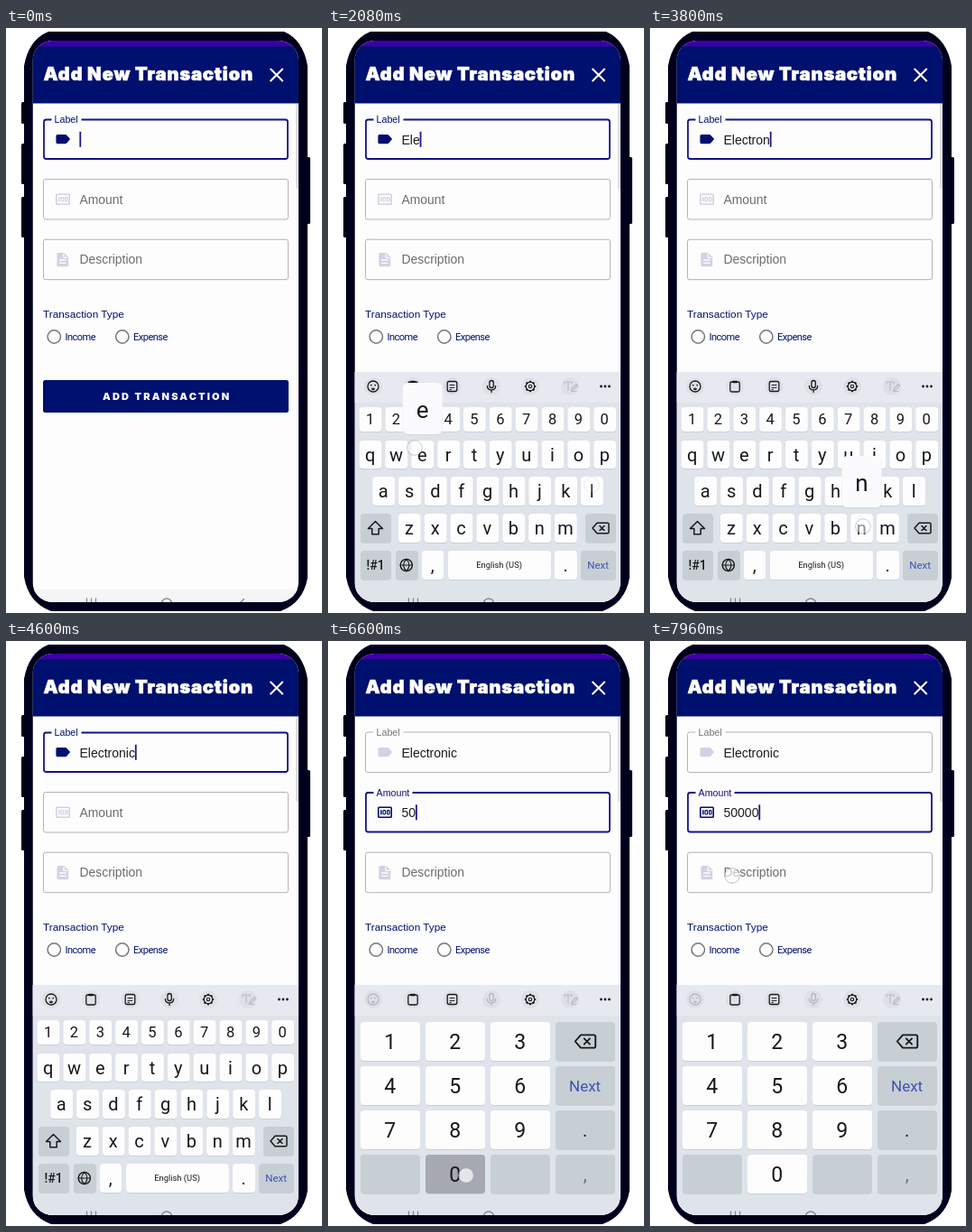
Recreate the animation shown at these times as an HTML page. Size 350 px wide and 648 px high, loop 8 s.

```html
<!DOCTYPE html>
<html lang="en">
<head>
<meta charset="utf-8">
<title>Add New Transaction</title>
<style>
html, body { margin: 0; width: 100%; height: 100%; overflow: hidden; background: #fff; }
svg { display: block; width: 350px; height: 648px; }
text { white-space: pre; }
.sans { font-family: "Liberation Sans", Arial, sans-serif; }
.rob { font-family: Roboto, sans-serif; }
.black { font-family: Inter, sans-serif; font-weight: 900; }
.mid { text-anchor: middle; }
.line { fill: none; stroke-linecap: round; stroke-linejoin: round; }
</style>
</head>
<body>
<svg id="stage" viewBox="0 0 350 648"></svg>
<script>
const LOOP = 8000;
const NAVY = '#00106e', INK = '#17181c', KEY = '#fdfdfe', GREY = '#c7cfd5', DOWN = '#a6a9b2';
const ACTIVE = '#14128c', IDLE = '#b3b3b8', PALE = '#d2d2e4';
const stage = document.getElementById('stage');
const $ = id => document.getElementById(id);
const clamp = v => Math.max(0, Math.min(1, v));
const ease = v => 1 - (1 - clamp(v)) ** 3;
const set = (id, attrs) => { for (const k in attrs) $(id).setAttribute(k, attrs[k]); };
const show = (id, on) => $(id).setAttribute('visibility', on ? 'visible' : 'hidden');

const rect = (x, y, w, h, fill, rx = 0, more = '') =>
  `<rect x="${x}" y="${y}" width="${w}" height="${h}" rx="${rx}" fill="${fill}" ${more}/>`;
const text = (x, y, size, fill, str, cls = 'sans', more = '') =>
  `<text x="${x}" y="${y}" font-size="${size}" fill="${fill}" class="${cls}" ${more}>${str}</text>`;
const line = (d, color, w = 1.4, more = '') =>
  `<path class="line" d="${d}" stroke="${color}" stroke-width="${w}" ${more}/>`;
const ring = (x, y, r, color, w = 1.4) =>
  `<circle cx="${x}" cy="${y}" r="${r}" fill="none" stroke="${color}" stroke-width="${w}"/>`;

// Keys
const keys = {};
function key(id, x, y, w, h, label, size, fill = KEY, color = INK, more = '') {
  keys[id] = { x, y, w, h, fill };
  return rect(x, y + 1, w, h, '#cbd0d8', 4) + rect(x, y, w, h, fill, 4, `id="k-${id}"`) +
    text(x + w / 2 - 0.4, y + h / 2 + size * 0.36, size, color, label, 'rob mid', `id="t-${id}" ${more}`);
}
const row = (chars, cx, y, h, size) => [...chars].map((c, i) =>
  key(c, cx + i * 28.85 - 12.4, y, 24.8, h, c, size)).join('');

function letterPad() {
  const globe = ring(86.8, 595, 6.6, INK) +
    line('M80.2 595h13.2M86.8 588.4c-4.2 4-4.2 9.2 0 13.2M86.8 588.4c4.2 4 4.2 9.2 0 13.2', INK, 1.2);
  return row('1234567890', 47, 420, 27, 16.5) + row('qwertyuiop', 47, 457, 31, 20) +
    row('asdfghjkl', 61.7, 497, 32, 20) + row('zxcvbnm', 90.3, 538, 32, 20) +
    key('shift', 36, 538, 34, 32, '', 16, GREY) + key('del', 285, 538, 34, 32, '', 16, GREY) +
    key('sym', 36, 579, 34, 32, '!#1', 14, GREY, INK, 'font-weight="500"') +
    key('globe', 75, 579, 25, 32, '', 16, GREY) +
    key('comma', 104, 579, 24, 32, ',', 20) + key('space', 133, 579, 114, 32, 'English (US)', 9.4) +
    key('dot', 251, 579, 25, 32, '.', 20) + key('next', 280, 579, 39, 32, 'Next', 11.5, GREY, '#4050b4') +
    line('M52.5 546.5l8 8h-4.3v6.2h-7.4v-6.2h-4.3z', INK, 1.5, 'id="arrow"') +
    backspace(302, 554, 1) + globe;
}
function backspace(x, y, s) {
  return `<g transform="translate(${x} ${y}) scale(${s})">` +
    line('M-9 0l5-5.7h11.5q1.5 0 1.5 1.5v8.4q0 1.5-1.5 1.5h-11.5zM-1 -2.5l5 5M4 -2.5l-5 5', INK, 1.5) + '</g>';
}
function numberPad() {
  const cols = [36, 108, 180, 252], rows = [422, 471, 520, 569];
  let out = '';
  for (let i = 0; i < 9; i++)
    out += key('n' + (i + 1), cols[i % 3], rows[i / 3 | 0], 66, 43, i + 1, 23);
  out += key('b1', 36, 569, 66, 43, '', 20, GREY) + key('n0', 108, 569, 66, 43, '0', 23) +
    key('b2', 180, 569, 66, 43, '', 20, GREY);
  ['', 'Next', '.', ','].forEach((c, i) => {
    out += key('side' + i, 252, rows[i], 66, 43, c, i === 1 ? 17 : 20, GREY, [INK, '#4050b4', INK, '#6a6f78'][i]);
  });
  return out + backspace(285, 443.5, 1.25);
}
function toolbar() {
  const disc = [50, 94, 137.5, 181, 224, 268].map(x =>
    `<circle cx="${x}" cy="397" r="10" fill="#dde0e6"/>`).join('');
  const teeth = [...Array(8)].map((_, i) =>
    `<path d="M223.2 390.8h1.6l.5 2h-2.6z" fill="${INK}" transform="rotate(${i * 45} 224 397)"/>`).join('');
  return disc +
    `<g id="face">${ring(50, 397, 6, INK, 1.3)}<circle cx="47.8" cy="395.6" r=".9" fill="${INK}"/><circle cx="52.2" cy="395.6" r=".9" fill="${INK}"/>` +
    line('M47.2 398.8q2.8 3 5.6 0', INK, 1.2, 'id="mouth"') + '</g>' +
    rect(88.8, 392, 10.4, 11, 'none', 1.8, `stroke="${INK}" stroke-width="1.3"`) + rect(91, 390.7, 6, 2.6, INK, 1) +
    rect(132.2, 391.5, 10.6, 11, 'none', 2, `stroke="${INK}" stroke-width="1.3"`) +
    line('M135 395.5h5M135 398.3h5M135 400.4h1.5', INK, 1) +
    `<g id="mic">${rect(178.9, 390.5, 4.4, 8, 'none', 2.2, `stroke="${INK}" stroke-width="1.3"`)}` +
    line('M176.4 396.5q0 4.4 4.6 4.4t4.6-4.4M181 401v2.5', INK, 1.3) + '</g>' +
    teeth + ring(224, 397, 4.8, INK, 1.2) + ring(224, 397, 1.7, INK, 1.1) +
    line('M262 394v-2h8v2M266 392v9M269.5 402l1-3 4.5-4.5 1.6 1.6-4.6 4.6zM270 402.5h5', '#b8bcc3', 1.2) +
    [302.5, 307, 311.5].map(x => `<circle cx="${x}" cy="397" r="1.4" fill="${INK}"/>`).join('');
}

// Form
const field = (id, y) => rect(41.5, y, 271, 44.5, 'none', 2.5, `id="${id}" stroke="${IDLE}"`);
// The thicker active outline keeps the same outer edge.
function outline(id, y, on) {
  const inset = on ? 0.5 : 0;
  set(id, {
    x: 41.5 + inset, y: y + inset, width: 271 - 2 * inset, height: 44.5 - 2 * inset,
    stroke: on ? ACTIVE : IDLE, 'stroke-width': on ? 1.8 : 1
  });
}
function form() {
  const radio = (x, label, tx) => ring(x, 342, 7.2, '#77777b', 1.5) +
    text(tx, 346.2, 11, NAVY, label, 'rob', 'letter-spacing="-.5"');
  return rect(29.5, 14, 294.5, 622, '#fdfdfd') + rect(29.5, 14, 294.5, 8, '#3a00a6') +
    rect(29.5, 20.5, 294.5, 63, NAVY) +
    text(41.5, 57.8, 20.4, '#fff', 'Add New Transaction', 'black', 'letter-spacing=".72" stroke="#fff" stroke-width=".6"') +
    line('M293.2 45.5l13 13M306.2 45.5l-13 13', '#fff', 2) +
    rect(321, 84, 3, 94, '#dedee2', 1) +
    field('box1', 101) + rect(50.5, 99, 33, 5, '#fdfdfd') +
    text(53.5, 105.3, 10.7, NAVY, 'Label', 'sans', 'id="cap1"') +
    '<path id="tag" d="M57 118h8.8q.9 0 1.5.7l3.8 4.4-3.8 4.4q-.6.7-1.5.7h-8.8q-1.6 0-1.6-1.6v-7q0-1.6 1.6-1.6z"/>' +
    text(81.5, 128.5, 14, '#1c1c20', '', 'sans', 'id="val1"') +
    field('box2', 167.5) + rect(50.5, 165.5, 43, 5, '#fdfdfd', 0, 'id="notch"') +
    text(0, 0, 13.9, '#6c6c70', 'Amount', 'sans', 'id="cap2"') +
    `<g id="note">${rect(55.8, 184.3, 14.4, 11, 'none', .8, 'stroke-width="1.6"')}` +
    '<path d="M58.8 187.3v5" stroke-width="1.5"/>' + rect(61, 187.6, 2.6, 4.4, 'none', .8, 'stroke-width="1.2"') +
    rect(65.6, 187.6, 2.4, 4.4, 'none', .8, 'stroke-width="1.2"') + '</g>' +
    text(81.5, 195, 14, '#1c1c20', '', 'sans', 'id="val2"') +
    field('box3', 234.2) +
    `<path d="M58 249h6.5l4.7 4.7v9q0 1.6-1.6 1.6h-9.6q-1.6 0-1.6-1.6v-12.1q0-1.6 1.6-1.6z" fill="${PALE}"/>` +
    line('M59.5 257h6.8M59.5 260.3h6.8M64 250.5v3.8h3.8', '#fdfdfd', 1.3) +
    text(81.5, 261.3, 13.9, '#6c6c70', 'Description') +
    text(41, 320.8, 11.8, NAVY, 'Transaction Type') +
    radio(53.3, 'Income', 65.5) + radio(128.8, 'Expense', 141) +
    rect(41, 390, 272, 36, NAVY, 2.5) +
    text(107, 412.3, 11, '#fff', 'ADD TRANSACTION', 'black', 'letter-spacing="2.15"') +
    rect(29.5, 622, 294.5, 14, '#f5f5f7') + rect(0, 0, 1.8, 17, '#24128c', 0, 'id="caret"');
}

function phone() {
  const shell = 'M47 4H308Q329 13 334 42V609Q329 637 304 646H50Q25 637 20 608V42Q25 13 47 4Z';
  const buttons = [[17, 82, 24], [17, 128, 45], [17, 187, 45], [332, 143, 74]];
  return `<path d="${shell}" fill="#00001d"/>` + buttons.map(([x, y, h]) => rect(x, y, 5, h, '#00001d', 1.5)).join('');
}

stage.innerHTML =
  '<defs><clipPath id="screen"><rect x="29.5" y="14" width="294.5" height="622" rx="22"/></clipPath></defs>' +
  phone() + '<g clip-path="url(#screen)">' + form() +
  '<g id="board">' + rect(29.5, 381, 294.5, 255, '#dfe3ea') + rect(29.5, 381, 294.5, 34, '#e6e9ef') + toolbar() +
  `<g id="letters">${letterPad()}</g><g id="numbers">${numberPad()}</g></g>` +
  line('M89.5 632v8M94.5 632v8M99.5 632v8', '#85888e', 1.3) + ring(178, 637.5, 5.5, '#85888e', 1.4) +
  line('M263.5 632.5l-5 5 5 5', '#85888e', 1.4, 'id="back"') +
  '<g id="pops"></g><g id="taps"></g></g>';

// Taps: key, touch time, release time, touch point, typed character
const taps = [
  ['shift', 960, 1060, 52, 557],
  ['e', 1300, 1400, 99, 468, 'E'],
  ['l', 1740, 1860, 292, 506, 'l'],
  ['e', 1900, 2000, 96, 465, 'e'],
  ['c', 2380, 2480, 148, 553, 'c'],
  ['t', 2780, 2880, 160, 468, 't'],
  ['r', 3120, 3280, 131, 466, 'r'],
  ['o', 3215, 3370, 281, 471, 'o'],
  ['n', 3620, 3720, 236, 552, 'n'],
  ['i', 3880, 3980, 250, 470, 'i'],
  ['c', 4180, 4280, 148, 553, 'c'],
  ['next', 5060, 5180, 299, 596],
  ['n5', 5800, 5900, 146, 494, '5'],
  ['n0', 6180, 6280, 150, 592, '0'],
  ['n0', 6520, 6640, 153, 592, '0'],
  ['n0', 6940, 7040, 152, 592, '0'],
  ['n0', 7400, 7500, 151, 592, '0'],
  ['', 7890, 8100, 91, 260]
].map(([id, down, up, x, y, char]) => ({ id, down, up, x, y, char }));

const FOCUS = 5240, SWAP = 5360, LAG = 40;

function popup(k, label) {
  const x = k.x + k.w / 2 - 22, y = k.y - 64;
  return rect(x, y + 1, 44, 57, '#d3d7dd', 6) + rect(x, y, 44, 57, '#fbfbfd', 6) +
    text(x + 22, y + 38.5, 26, INK, label, 'rob mid');
}

function draw(t) {
  const second = t >= FOCUS, upper = t >= 1060 && t < 1400;
  const rise = ease((t - 160) / 320);
  $('board').setAttribute('transform', `translate(0 ${255 * (1 - rise)})`);
  show('board', t >= 160);
  show('back', t < 160);
  show('letters', t >= 160 && t < SWAP);
  show('numbers', t >= SWAP);
  set('face', { opacity: t < SWAP ? 1 : 0.2 });
  set('mic', { opacity: t < SWAP ? 1 : 0.2 });
  set('mouth', { d: t < 1060 ? 'M47.2 398.8q2.8 3 5.6 0' : 'M48.5 399.8q1.5 -1.6 3 0q-1.5 1.6 -3 0' });
  set('arrow', { fill: upper ? '#4050b4' : 'none', stroke: upper ? '#4050b4' : INK });
  for (const c of 'qwertyuiopasdfghjklzxcvbnm') $('t-' + c).textContent = upper ? c.toUpperCase() : c;
  for (const id in keys) $('k-' + id).setAttribute('fill', keys[id].fill);

  let label = '', amount = '', pops = '', dots = '', last = second ? FOCUS : 0;
  for (const p of taps) {
    if (t < p.down) continue;
    if (p.char && t >= p.up) {
      if (p.up < FOCUS) label += p.char; else amount += p.char;
      last = Math.max(last, p.up);
    }
    if (p.id && t >= p.down + LAG && t < p.up) $('k-' + p.id).setAttribute('fill', DOWN);
    if (p.char && p.id.length === 1 && t >= p.down + LAG && t < p.up + 120)
      pops += popup(keys[p.id], p.char);
    const alpha = clamp((t - p.down) / 80) * clamp(1 - (t - p.up) / 300);
    if (alpha > 0)
      dots += `<circle cx="${p.x}" cy="${p.y}" r="8.3" fill="#fff" fill-opacity=".7" stroke="#a4a6b4" stroke-width=".8" opacity="${alpha}"/>`;
  }
  $('pops').innerHTML = pops;
  $('taps').innerHTML = dots;
  $('val1').textContent = label;
  $('val2').textContent = amount;

  const live = second ? 'val2' : 'val1', str = second ? amount : label;
  set('caret', { x: 81.4 + (str ? $(live).getComputedTextLength() : 0), y: second ? 181.3 : 114.8 });
  show('caret', (t - last) % 1000 < 500);

  outline('box1', 101, !second);
  outline('box2', 167.5, second);
  set('cap1', { fill: second ? '#77777b' : NAVY });
  set('tag', { fill: second ? PALE : NAVY });
  set('note', { stroke: second ? NAVY : PALE });
  const f = ease((t - FOCUS) / 150);
  set('cap2', {
    x: 81.5 - 28 * f, y: 194.8 - 22.8 * f, 'font-size': 13.9 - 3.2 * f,
    fill: second ? '#14107e' : '#6c6c70'
  });
  show('notch', f > 0.4);
}

const start = performance.now();
function tick() {
  draw((performance.now() - start) % LOOP);
  requestAnimationFrame(tick);
}
draw(0);
requestAnimationFrame(tick);
</script>
</body>
</html>
```
